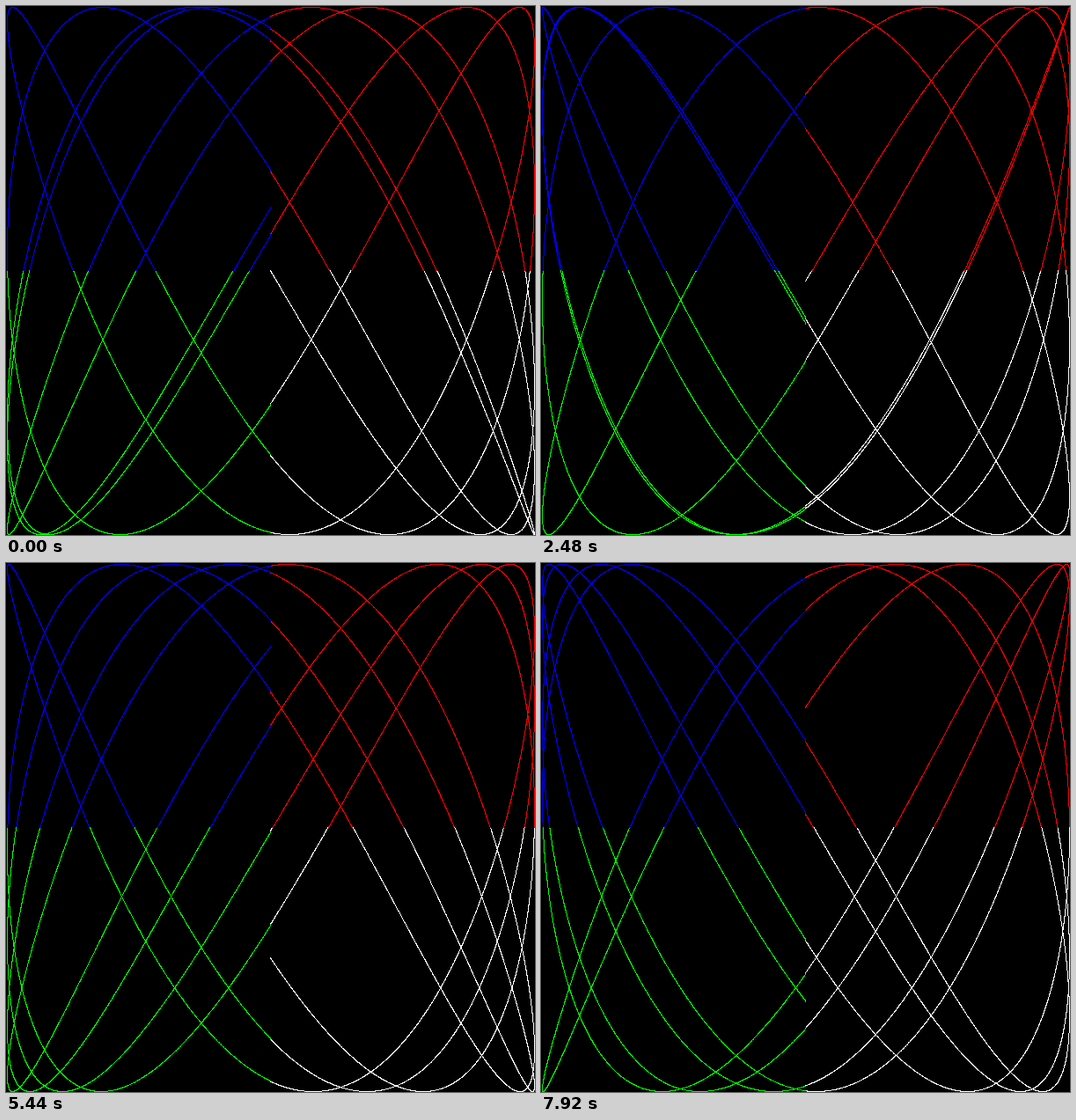
An HTML page with a canvas for the animation above (8000 ms loop, 601 by 601 pixels).

```html
<!DOCTYPE html>
<html lang="en">
<head>
<meta charset="utf-8">
<title>Lissajous</title>
<style>
  html, body { margin: 0; width: 100%; height: 100%; overflow: hidden; background: #000; }
  canvas { display: block; width: 601px; height: 601px; image-rendering: pixelated; }
</style>
</head>
<body>
<canvas id="stage" width="601" height="601"></canvas>
<script>
  const R = 300, SIDE = 2 * R + 1;
  const CYCLES = 5, RES = 0.001, FREQ = 1.70785;
  const DELAY = 80, COUNT = 100, PHASE_STEP = 0.1;

  // Packed as ABGR
  const BLACK = 0xff000000, WHITE = 0xffffffff;
  const RED = 0xff0000ff, GREEN = 0xff00ff00, BLUE = 0xffff0000;

  const ctx = document.getElementById('stage').getContext('2d');
  const image = ctx.createImageData(SIDE, SIDE);
  const pixels = new Uint32Array(image.data.buffer);

  // Rounds by truncating toward zero, so the centre row and column are wider
  const toPixel = v => R + Math.trunc(v * R + 0.5);

  function quadrant(x, y) {
    if (y >= 0) return x >= 0 ? WHITE : GREEN;
    return x >= 0 ? RED : BLUE;
  }

  function draw(phase) {
    pixels.fill(BLACK);
    const end = CYCLES * 2 * Math.PI;
    for (let t = 0; t < end; t += RES) {
      const x = Math.sin(t), y = Math.sin(t * FREQ + phase);
      pixels[toPixel(y) * SIDE + toPixel(x)] = quadrant(x, y);
    }
    ctx.putImageData(image, 0, 0);
  }

  const start = performance.now();
  let shown = -1;

  function tick() {
    const step = Math.floor((performance.now() - start) / DELAY) % COUNT;
    if (step !== shown) {
      shown = step;
      draw(step * PHASE_STEP);
    }
    requestAnimationFrame(tick);
  }
  tick();
</script>
</body>
</html>
```
